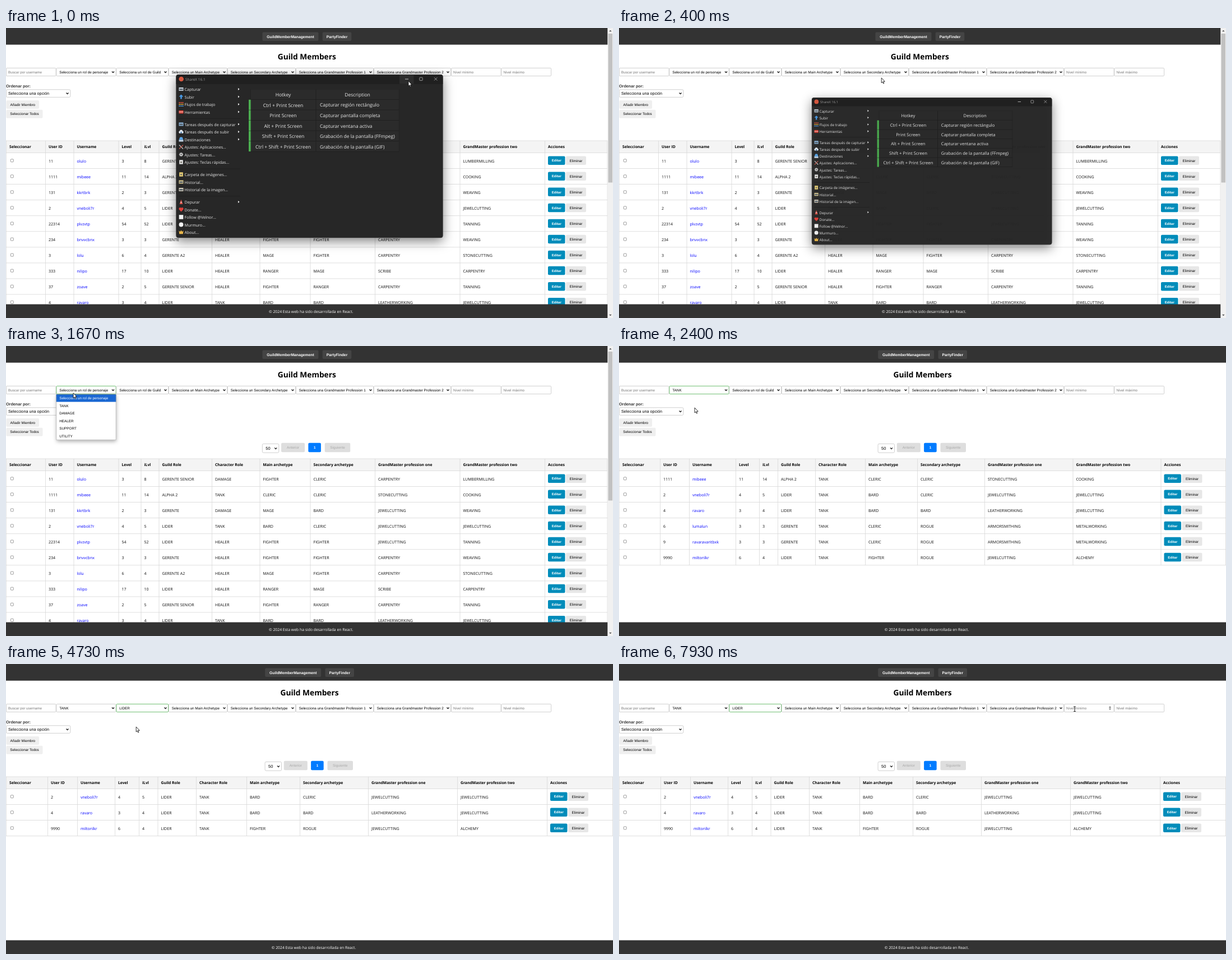
An HTML page with a canvas for the animation above (8 s loop, 1083 by 517 pixels).

```html
<!DOCTYPE html>
<html lang="es">
<head>
<meta charset="utf-8">
<title>Guild Members</title>
<style>
html, body { margin: 0; width: 1083px; height: 517px; overflow: hidden; background: #fff; }
canvas { display: block; }
</style>
</head>
<body>
<canvas id="stage" width="1083" height="517"></canvas>
<script>
const ctx = document.getElementById('stage').getContext('2d');
const LOOP = 8000, TICK = 1000 / 15;
const SANS = '"Open Sans", "Noto Sans", sans-serif';
const ARIAL = '"Liberation Sans", Arial, sans-serif';
const ROW_H = 28.05, TABLE_TOP = 201, ROWS_TOP = 222.5, FOOT_TOP = 492.5;

// Moments at which the page reacts
const OPEN_ROLE = 1467, PICK_ROLE = 2400, OPEN_GUILD = 3600, PICK_GUILD = 4667;

const heads = ['Seleccionar', 'User ID', 'Username', 'Level', 'iLvl', 'Guild Role', 'Character Role',
  'Main archetype', 'Secondary archetype', 'GrandMaster profession one', 'GrandMaster profession two', 'Acciones'];

const members = `11|olulo|3|8|GERENTE SENIOR|DAMAGE|FIGHTER|CLERIC|CARPENTRY|LUMBERMILLING
1111|mibeee|11|14|ALPHA 2|TANK|CLERIC|CLERIC|STONECUTTING|COOKING
131|kkrtbrk|2|3|GERENTE|DAMAGE|MAGE|BARD|JEWELCUTTING|WEAVING
2|vneboli7r|4|5|LIDER|TANK|BARD|CLERIC|JEWELCUTTING|JEWELCUTTING
22314|plvzvtp|54|52|LIDER|HEALER|FIGHTER|FIGHTER|JEWELCUTTING|TANNING
234|bnvvcbnx|3|3|GERENTE|HEALER|FIGHTER|FIGHTER|CARPENTRY|WEAVING
3|lolu|6|4|GERENTE A2|HEALER|MAGE|FIGHTER|CARPENTRY|STONECUTTING
333|nilipo|17|10|LIDER|HEALER|RANGER|MAGE|SCRIBE|CARPENTRY
37|zoave|2|5|GERENTE SENIOR|HEALER|FIGHTER|RANGER|CARPENTRY|TANNING
4|ravaro|3|4|LIDER|TANK|BARD|BARD|LEATHERWORKING|JEWELCUTTING
6|lumalun|3|3|GERENTE|TANK|CLERIC|ROGUE|ARMORSMITHING|METALWORKING
9|ravaravaritbxk|3|3|GERENTE|TANK|CLERIC|ROGUE|ARMORSMITHING|METALWORKING
9990|miltonlkr|6|4|LIDER|TANK|FIGHTER|ROGUE|JEWELCUTTING|ALCHEMY`.split('\n').map(r => r.split('|'));

const tanks = members.filter(m => m[5] === 'TANK');
const views = [
  { width: 1073.5, rows: members, cols: [6, 76, 126.5, 206.5, 246.5, 278.5, 373, 458.5, 548.5, 664, 815.5, 967] },
  { width: 1083, rows: tanks, cols: [6, 79, 131, 214, 256, 289, 356, 445, 538, 658, 815.5, 972.5] },
  { width: 1083, rows: tanks.filter(m => m[4] === 'LIDER'),
    cols: [6, 80, 133, 200, 243, 276.5, 345, 435, 530, 652, 811, 971] }
];

const edges = [0, 89.5, 196.5, 290, 395, 517, 656, 794, 883.5, 973];
const filters = ['Buscar por username', 'Selecciona un rol de personaje', 'Selecciona un rol de Guild',
  'Selecciona un Main Archetype', 'Selecciona un Secondary Archetype', 'Selecciona una Grandmaster Profession 1',
  'Selecciona una Grandmaster Profession 2', 'Nivel mínimo', 'Nivel máximo'];
const roleList = [filters[1], 'TANK', 'DAMAGE', 'HEALER', 'SUPPORT', 'UTILITY'];
const guildList = [filters[2], 'LIDER', 'GERENTE SENIOR', 'GERENTE', 'GERENTE A2', 'ALPHA 1', 'ALPHA 2'];

// Pointer path: time, x, y
const path = [[0, 718, 94.5], [133, 718, 94.5], [200, 690, 95], [267, 640, 96], [333, 573, 95], [400, 470, 89],
  [467, 350, 78], [533, 235, 64], [600, 150, 53], [667, 102, 57], [733, 76, 46], [800, 66, 51], [1000, 99, 63],
  [1200, 115, 75], [1600, 115, 75], [1867, 135, 110], [2600, 135, 110], [2867, 230, 72], [3067, 230, 72],
  [3333, 230, 77], [3733, 230, 77], [4133, 232, 112], [4733, 232, 112], [5133, 290, 94], [5467, 373, 78],
  [5800, 500, 90], [6133, 635, 101], [6333, 684, 90], [6733, 775, 79], [7133, 821, 83], [7867, 821, 83],
  [7933, 813, 80], [LOOP, 813, 80]];

const menu = [
  [109.5, 'Capturar', 'card', '#c9d3dc', 1], [123, 'Subir', 'up', '#4a9be8', 1],
  [136.5, 'Flujos de trabajo', 'grid', '#e0563f', 1], [150, 'Herramientas', 'box', '#d8473c', 1],
  [172, 'Tareas después de capturar', 'card', '#8fb9e0', 1], [185.5, 'Tareas después de subir', 'cloud', '#dfe6ee', 1],
  [199, 'Destinaciones', 'drive', '#5aa5e6', 1], [212.5, 'Ajustes: Aplicaciones...', 'cross', '#c9c9c9'],
  [226, 'Ajustes: Tareas...', 'gear', '#d6d6d6'], [239.5, 'Ajustes: Teclas rápidas...', 'page', '#e4e4e4'],
  [261.5, 'Carpeta de imágenes...', 'page', '#e8cf74'], [275, 'Historial...', 'card', '#dccb91'],
  [288.5, 'Historial de la imagen...', 'card', '#d5cdbb'], [310.5, 'Depurar', 'cone', '#e2564c', 1],
  [324, 'Donate...', 'heart', '#e2413b'], [337.5, 'Follow @Velnor...', 'square', '#f2f2f2'],
  [351, 'Murmuro...', 'dot', '#f2f2f2'], [364.5, 'About...', 'crown', '#e8b64a']
];
const hotkeys = [['Ctrl + Print Screen', 'Capturar región rectángulo'], ['Print Screen', 'Capturar pantalla completa'],
  ['Alt + Print Screen', 'Capturar ventana activa'], ['Shift + Print Screen', 'Grabación de la pantalla (FFmpeg)'],
  ['Ctrl + Shift + Print Screen', 'Grabación de la pantalla (GIF)']];

// y is the middle of the capitals
function text(s, x, y, size, color = '#000', family = SANS, weight = 400, align = 'left') {
  ctx.font = `${weight} ${size}px ${family}`;
  ctx.textAlign = align;
  ctx.fillStyle = color;
  ctx.fillText(s, x, y + size * 0.36);
}

function rect(x, y, w, h, fill) {
  ctx.fillStyle = fill;
  ctx.fillRect(x, y, w, h);
}

function box(x, y, w, h, r, fill, stroke, line = 0.8) {
  ctx.beginPath();
  ctx.roundRect(x, y, w, h, r);
  if (fill) { ctx.fillStyle = fill; ctx.fill(); }
  if (stroke) { ctx.strokeStyle = stroke; ctx.lineWidth = line; ctx.stroke(); }
}

function poly(points, fill, stroke, line = 1) {
  ctx.beginPath();
  points.forEach(([x, y]) => ctx.lineTo(x, y));
  if (fill) { ctx.closePath(); ctx.fillStyle = fill; ctx.fill(); }
  if (stroke) { ctx.strokeStyle = stroke; ctx.lineWidth = line; ctx.stroke(); }
}

function disc(x, y, r, fill) {
  ctx.beginPath();
  ctx.arc(x, y, r, 0, 7);
  ctx.fillStyle = fill;
  ctx.fill();
}

const chevron = (x, y) => poly([[x - 2, y - 1.1], [x, y + 1.1], [x + 2, y - 1.1]], null, '#111', 1.2);

function button(label, x, y, w, h, fill, color, size, weight) {
  box(x, y, w, h, 2, fill);
  text(label, x + w / 2, y + h / 2, size, color, ARIAL, weight, 'center');
}

function drawFilters(t, overMin) {
  const focus = t >= OPEN_GUILD ? 2 : t >= OPEN_ROLE ? 1 : 0;
  filters.forEach((label, i) => {
    const x = edges[i], w = edges[i + 1] - x, input = i === 0 || i > 6;
    box(x + 0.4, 71.4, w - 0.8, 14.2, 1.5, '#fff', focus && i === focus ? '#4caf50' : '#c4c4c4');
    if (i === 1 && t >= PICK_ROLE) label = 'TANK';
    if (i === 2 && t >= PICK_GUILD) label = 'LIDER';
    text(label, x + (input ? 4 : 5.7), 78.6, input ? 6.27 : 6.35, input ? '#757575' : '#000', ARIAL);
    if (!input) chevron(x + w - 5.5, 78.6);
  });
  if (overMin) {
    poly([[874, 77.8], [876, 75.6], [878, 77.8]], '#444');
    poly([[874, 79.4], [876, 81.6], [878, 79.4]], '#444');
  }
}

function drawTable(view) {
  const { width, rows, cols } = view;
  const bottom = ROWS_TOP + rows.length * ROW_H;
  rect(0, TABLE_TOP, width, ROWS_TOP - TABLE_TOP, '#f4f4f4');
  heads.forEach((h, i) => text(h, cols[i], 212, 6.8, '#000', SANS, 700));
  rows.forEach((row, n) => {
    const y = ROWS_TOP + n * ROW_H, mid = y + 14.5;
    box(8.3, y + 11.3, 5, 5, 1, '#fff', '#767676', 0.7);
    row.forEach((cell, i) => text(cell, cols[i + 1], mid, 7.05, i === 1 ? '#00f' : '#111'));
    button('Editar', cols[11], y + 6, 30.5, 15.5, '#008cba', '#fff', 6.05, 700);
    button('Eliminar', cols[11] + 32, y + 6, 36, 15.5, '#e7e7e7', '#000', 6.35);
    rect(0, y - 0.4, width, 0.8, '#d8d8d8');
  });
  rect(0, TABLE_TOP - 0.4, width, 0.8, '#d8d8d8');
  rect(0, bottom - 0.4, width, 0.8, '#d8d8d8');
  [5.7, ...cols.slice(1), width + 5].forEach(x => rect(x - 5.9, TABLE_TOP, 0.8, bottom - TABLE_TOP, '#d8d8d8'));
}

function drawPage(t, overMin) {
  const view = views[t >= PICK_GUILD ? 2 : t >= PICK_ROLE ? 1 : 0];
  const { width } = view, mid = width / 2;
  rect(0, 0, 1083, 517, '#fff');
  rect(0, 0, width, 29.7, '#333');
  button('GuildMemberManagement', mid - 79.3, 7.5, 100, 15.5, '#444', '#fff', 6.75, 700);
  button('PartyFinder', mid + 28, 7.5, 51.5, 15.5, '#444', '#fff', 6.75, 700);
  text('Guild Members', mid, 50.7, 13.75, '#000', SANS, 700, 'center');
  drawFilters(t, overMin);

  text('Ordenar por:', 0, 103, 7.2, '#333', ARIAL, 700);
  box(0.4, 109.8, 114.4, 13.6, 2, '#fff', '#c4c4c4');
  text('Selecciona una opción', 4, 116.6, 7.25, '#000', ARIAL);
  chevron(109.5, 116.6);
  button('Añadir Miembro', 0.5, 129, 58.5, 15, '#efefef', '#000', 6.32);
  button('Seleccionar Todos', 0.5, 145.7, 65, 15, '#efefef', '#000', 6.32);

  box(mid - 79.4, 174.4, 29.4, 15.8, 2, '#fff', '#c4c4c4');
  text('50', mid - 73.5, 182.5, 7.5, '#000', ARIAL);
  chevron(mid - 55.5, 182.5);
  button('Anterior', mid - 45.7, 172.8, 42, 16.5, '#dedede', '#a9a9a9', 6.32);
  button('1', mid + 2.6, 172.8, 22.6, 16.5, '#007bff', '#fff', 6.32, 700);
  button('Siguiente', mid + 32, 172.8, 45.5, 16.5, '#dedede', '#a9a9a9', 6.32);

  drawTable(view);
  rect(0, FOOT_TOP, width, 517 - FOOT_TOP, '#333');
  text('© 2024 Esta web ha sido desarrollada en React.', mid + 7.5, 505.3, 6.84, '#fff', SANS, 400, 'center');

  if (width < 1083) {
    rect(width, 0, 9.5, 517, '#f1f1f1');
    rect(1074.5, 10, 7.5, 265.5, '#c1c1c1');
    poly([[1076, 6.2], [1078.3, 3.7], [1080.6, 6.2]], '#505050');
    poly([[1076, 510.8], [1078.3, 513.3], [1080.6, 510.8]], '#505050');
  }
}

function drawList(list, col, opened, t, py) {
  const x = edges[col], w = edges[col + 1] - x, rowH = 13.6;
  const active = Math.max(0, Math.floor((py - 86) / rowH));
  ctx.save();
  ctx.globalAlpha = t < opened + 60 ? 0.6 : 1;
  ctx.shadowColor = 'rgba(0,0,0,.35)';
  ctx.shadowBlur = 7;
  ctx.shadowOffsetY = 2;
  rect(x, 86, w, rowH * list.length, '#fff');
  ctx.shadowColor = 'transparent';
  list.forEach((label, i) => {
    const y = 86 + i * rowH, on = i === active;
    if (on) rect(x, y, w, rowH, '#1967d2');
    text(label, x + 5.7, y + rowH / 2, 6.35, on ? '#fff' : '#000', ARIAL);
  });
  box(x + 0.3, 86.3, w - 0.6, rowH * list.length - 0.6, 0, null, '#999', 0.6);
  ctx.restore();
}

const icons = {
  card(x, y, c) { rect(x - 4, y - 3, 8, 6, c); rect(x - 3, y - 1, 6, 2.6, '#56616b'); },
  up(x, y, c) { poly([[x, y - 4], [x + 4, y], [x + 1.3, y], [x + 1.3, y + 4], [x - 1.3, y + 4], [x - 1.3, y], [x - 4, y]], c); },
  grid(x, y, c) {
    [c, '#e4ae3c', '#4f9be0'].forEach((k, i) => [-3, 0, 3].forEach(d => rect(x + d - 1, y + i * 3 - 4, 2, 2, k)));
  },
  box(x, y, c) { rect(x - 4, y - 2.5, 8, 5.5, c); rect(x - 4, y - 0.3, 8, 0.9, '#f1d3cf'); },
  cloud(x, y, c) { disc(x - 2, y + 0.8, 2.2, c); disc(x + 2, y + 0.8, 2.2, c); disc(x, y - 0.9, 2.6, c); rect(x - 1, y, 2, 3, '#3d6f9f'); },
  drive(x, y, c) { poly([[x - 2, y - 4], [x + 2, y - 4], [x + 4, y + 1], [x - 4, y + 1]], c); rect(x - 4, y + 1, 8, 3, '#c4d6e8'); },
  cross(x, y, c) { poly([[x - 3.5, y - 3.5], [x + 3.5, y + 3.5]], null, c, 1.3); poly([[x + 3.5, y - 3.5], [x - 3.5, y + 3.5]], null, '#c65b50', 1.3); },
  gear(x, y, c) {
    for (let a = 0; a < 4; a++) {
      const dx = 3.7 * Math.cos(a * Math.PI / 4), dy = 3.7 * Math.sin(a * Math.PI / 4);
      poly([[x - dx, y - dy], [x + dx, y + dy]], null, c, 1.3);
    }
    disc(x, y, 2.5, c);
    disc(x, y, 1.1, '#272727');
  },
  page(x, y, c) { rect(x - 3.3, y - 3.7, 6.6, 7.4, c); rect(x - 1.5, y - 1, 3, 2.5, '#77746a'); },
  cone(x, y, c) { poly([[x, y - 4.2], [x + 2.8, y + 4], [x - 2.8, y + 4]], c); rect(x - 1.6, y, 3.2, 1.2, '#f2dcd9'); },
  heart(x, y, c) { disc(x - 1.8, y - 1.2, 2.2, c); disc(x + 1.8, y - 1.2, 2.2, c); poly([[x - 3.8, y], [x + 3.8, y], [x, y + 4]], c); },
  square(x, y, c) { rect(x - 3.8, y - 3.8, 7.6, 7.6, c); },
  dot(x, y, c) { disc(x, y, 3.9, c); },
  crown(x, y, c) { poly([[x - 4, y - 3], [x - 2, y - 0.8], [x, y - 3.5], [x + 2, y - 0.8], [x + 4, y - 3], [x + 3.3, y + 3.3], [x - 3.3, y + 3.3]], c); }
};

// The tool window shrinks toward the taskbar and fades
function drawWindow(t) {
  const u = Math.min(1, Math.max(0, (t - 263) / 270)), p = u ** 3;
  if (p === 1) return;
  const cx = 541.5, cy = 228.5, scale = 1 - 0.75 * p;
  ctx.save();
  ctx.globalAlpha = 1 - Math.max(0, (p - 0.1) / 0.9);
  ctx.translate(cx + 125 * p, cy + 200 * p);
  ctx.scale(scale, scale);
  ctx.translate(-cx, -cy);

  ctx.shadowColor = 'rgba(0,0,0,.5)';
  ctx.shadowBlur = 20;
  ctx.shadowOffsetY = 6;
  box(303.5, 83, 476, 291, 4, '#272727');
  ctx.shadowColor = 'transparent';
  box(303.5, 83, 476, 17, [4, 4, 0, 0], '#202020');
  if (t < 195) rect(702, 83.5, 25.5, 16, '#2d2d2d');
  box(303.7, 83.2, 475.6, 290.6, 4, null, '#3c3c3c', 0.5);

  disc(312.7, 91, 4.3, '#d9583f');
  text('ShareX 16.1', 320, 91.2, 6.5, '#9a9a9a');
  rect(712, 90.6, 6, 0.9, '#d0d0d0');
  box(737.8, 88.2, 5.4, 5.4, 1, null, '#b5b5b5', 0.8);
  poly([[764, 88.2], [769.4, 93.6]], null, '#b5b5b5', 0.8);
  poly([[769.4, 88.2], [764, 93.6]], null, '#b5b5b5', 0.8);

  menu.forEach(([y, label, icon, color, sub]) => {
    icons[icon](312.5, y - 0.5, color);
    text(label, 318.5, y + 0.3, 7.1, '#e8e8e8');
    if (sub) poly([[414, y - 2.5], [416.6, y - 0.5], [414, y + 1.5]], '#eee');
  });
  [161, 250.7, 299.5].forEach(y => rect(308, y, 110, 0.7, '#1e1e1e'));

  rect(436.5, 109, 265, 111.5, '#1f1f1f');
  [['Hotkey', 'Description'], ...hotkeys].forEach(([key, desc], i) => {
    const y = 109.3 + i * 18.55, mid = y + 9.6;
    rect(437, y, 115.6, 17.7, '#2b2b2b');
    rect(553.4, y, 147.6, 17.7, '#2b2b2b');
    if (i) rect(433, y, 3.7, 18, '#4caf50');
    text(key, 494.5, mid, 8.55, '#e8e8e8', SANS, 400, 'center');
    if (i) text(desc, 560, mid, 8.45, '#e8e8e8');
    else text(desc, 627, mid, 8.55, '#e8e8e8', SANS, 400, 'center');
  });
  ctx.restore();
}

function pointerAt(t) {
  const i = Math.max(1, path.findIndex(k => k[0] >= t));
  const [t0, x0, y0] = path[i - 1], [t1, x1, y1] = path[i];
  const f = (t - t0) / (t1 - t0);
  return [x0 + (x1 - x0) * f, y0 + (y1 - y0) * f];
}

function drawPointer(x, y, beam) {
  if (beam) {
    rect(x - 0.5, y - 4, 1, 8.5, '#222');
    rect(x - 2, y - 4.5, 4, 0.9, '#222');
    rect(x - 2, y + 4, 4, 0.9, '#222');
    return;
  }
  const shape = [[0, 0], [0, 9], [2, 7.2], [3.4, 10.3], [4.7, 9.7], [3.4, 6.7], [6.1, 6.5], [0, 0]];
  poly(shape.map(([dx, dy]) => [x + dx, y + dy]), '#fff', '#000', 0.8);
}

function draw(now) {
  const t = Math.floor((now % LOOP + 5) / TICK) * TICK + 1;
  const [x, y] = pointerAt(Math.min(t, LOOP));
  const overMin = x > edges[7] && x < edges[8] && y > 71 && y < 86;
  ctx.textRendering = 'geometricPrecision';
  drawPage(t, overMin);
  drawWindow(t);
  if (t >= OPEN_ROLE && t < PICK_ROLE) drawList(roleList, 1, OPEN_ROLE, t, y);
  if (t >= OPEN_GUILD && t < PICK_GUILD) drawList(guildList, 2, OPEN_GUILD, t, y);
  drawPointer(x, y, overMin);
}

const start = performance.now();
function loop() {
  draw(performance.now() - start);
  requestAnimationFrame(loop);
}
loop();
</script>
</body>
</html>
```
